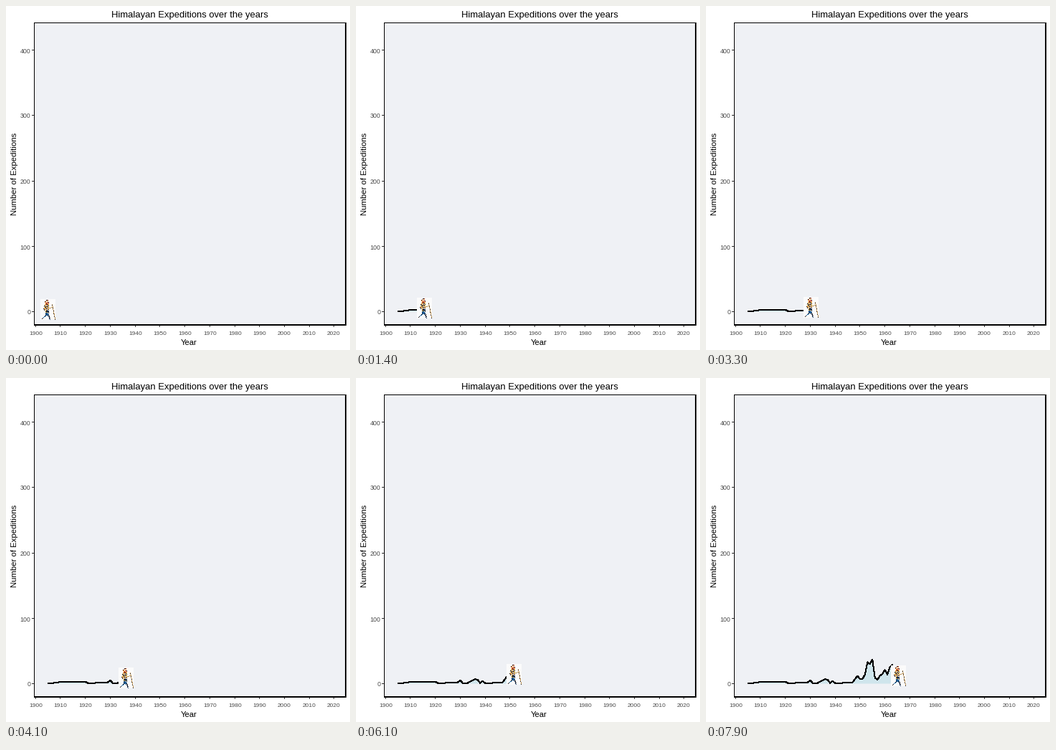
Animation of 480x480 px, one loop 8000 ms. Source, as a matplotlib script:

```python
import numpy as np
import matplotlib.pyplot as plt
from matplotlib.animation import FuncAnimation
from matplotlib.patches import Rectangle

SIZE, DPI = 480, 100
FRAMES, INTERVAL = 80, 100
PX = 72 / DPI                     # points per pixel
START, STEP = 1905, 114 / 149     # first year, years per frame

# Expeditions per year; gaps are bridged linearly
EARLY = [(1905, 1), (1907, 1), (1909, 2), (1910, 3), (1920, 3), (1921, 1),
         (1924, 1), (1925, 2), (1929, 2), (1930, 5), (1931, 1), (1933, 1),
         (1934, 3), (1936, 7), (1937, 6), (1938, 1), (1939, 4), (1940, 1),
         (1943, 1), (1944, 2)]
LATE = [2, 7, 12, 7, 7, 14, 33, 30, 37, 9, 6, 12, 15, 21, 14, 25, 29, 17, 10, 10]
DATA = EARLY + [(1947 + i, v) for i, v in enumerate(LATE)]
YEARS, COUNTS = np.array(DATA, float).T


def to_x(year):
    return 41.2 + 3.473 * (np.asarray(year) - 1900)


def to_y(count):
    return 426.5 - 0.9125 * np.asarray(count)


def make_climber():
    """Small speckled hiker on a near-white card, 21 x 29 pixels."""
    rng = np.random.default_rng(4)
    img = np.full((29, 21, 3), 251, np.uint8)

    def band(rows, cols, palette, density=1.0):
        for r in range(*rows):
            for c in range(*cols):
                if rng.random() < density:
                    img[r, c] = palette[rng.integers(len(palette))]

    def stroke(a, b, color, gap=1):
        n = max(abs(b[0] - a[0]), abs(b[1] - a[1]))
        for i in range(0, n + 1, gap):
            c = round(a[0] + (b[0] - a[0]) * i / n)
            r = round(a[1] + (b[1] - a[1]) * i / n)
            img[r, c] = color

    red, orange, yellow = (176, 48, 34), (222, 128, 52), (240, 200, 96)
    dark, blue, navy = (34, 30, 34), (30, 104, 164), (18, 50, 92)
    tan, cream = (190, 150, 90), (250, 232, 196)
    band((1, 3), (7, 11), [red, orange, dark], 0.8)
    band((3, 8), (6, 12), [red, orange, orange, yellow, dark], 0.9)
    band((8, 16), (5, 12), [yellow, orange, dark, tan, cream, dark], 0.85)
    band((9, 14), (4, 6), [dark, tan, cream], 0.7)
    band((16, 19), (7, 12), [blue, dark, yellow, navy])
    band((19, 23), (7, 12), [blue, blue, navy], 0.9)
    stroke((7, 22), (2, 27), dark)
    stroke((8, 22), (4, 25), blue)
    stroke((10, 22), (13, 28), navy)
    stroke((11, 22), (13, 26), dark)
    stroke((12, 12), (16, 11), tan)
    stroke((16, 7), (20, 27), tan)
    stroke((16, 8), (20, 28), dark, 4)
    return img


fig = plt.figure(figsize=(SIZE / DPI, SIZE / DPI), dpi=DPI, facecolor="white")
ax = fig.add_axes([0, 0, 1, 1])
ax.axis("off")


def box(x0, y0, x1, y1, color):
    ax.add_patch(Rectangle((x0, y0), x1 - x0, y1 - y0, fc=color, ec="none",
                           antialiased=False, zorder=0))


def label(x, y, text, size, color="black", **kw):
    ax.text(x, y, text, fontsize=size * PX, color=color,
            family="Liberation Sans", **kw)


box(39, 23, 475, 446, "black")
box(40, 24, 473, 444, "#eff1f5")

for year in range(1900, 2021, 10):
    x = int(to_x(year))
    box(x, 446, x + 1, 448, "#333333")
    label(x + 0.3, 459, str(year), 8.4, "#4d4d4d", ha="center", va="baseline")
for count in range(0, 401, 100):
    y = int(to_y(count))
    box(36, y, 39, y + 1, "#333333")
    label(34.3, y + 4.5, str(count), 8.8, "#4d4d4d", ha="right", va="baseline")

label(256, 16, "Himalayan Expeditions over the years", 13, ha="center", va="baseline")
label(255.5, 473, "Year", 11.2, ha="center", va="baseline")
label(17.5, 234.5, "Number of Expeditions", 11.4, ha="right", va="center", rotation=90)

area, = ax.fill([0], [0], fc="#cfe5ec", ec="none", zorder=2)
line, = ax.plot([], [], color="black", lw=PX, antialiased=False, zorder=3)
climber = ax.imshow(make_climber(), extent=(0, 21, 29, 0), aspect="auto",
                    interpolation="nearest", zorder=4)
ax.set_xlim(0, SIZE)
ax.set_ylim(SIZE, 0)


def update(frame):
    now = START + frame * STEP
    shown = YEARS < now
    count = np.interp(now, YEARS, COUNTS)
    xs = to_x(np.append(YEARS[shown], now))
    ys = to_y(np.append(COUNTS[shown], count))
    line.set_data(xs, ys)
    area.set_xy(np.column_stack([np.r_[xs, xs[-1], xs[0]],
                                 np.r_[ys, to_y(0), to_y(0)]]))
    left, top = round(xs[-1] - 10.5), round(ys[-1] - 16.6)
    climber.set_extent((left, left + 21, top + 29, top))
    ax.set_xlim(0, SIZE)
    ax.set_ylim(SIZE, 0)
    return area, line, climber


anim = FuncAnimation(fig, update, frames=FRAMES, interval=INTERVAL,
                     repeat=True, repeat_delay=0, blit=False)
plt.show()
```
